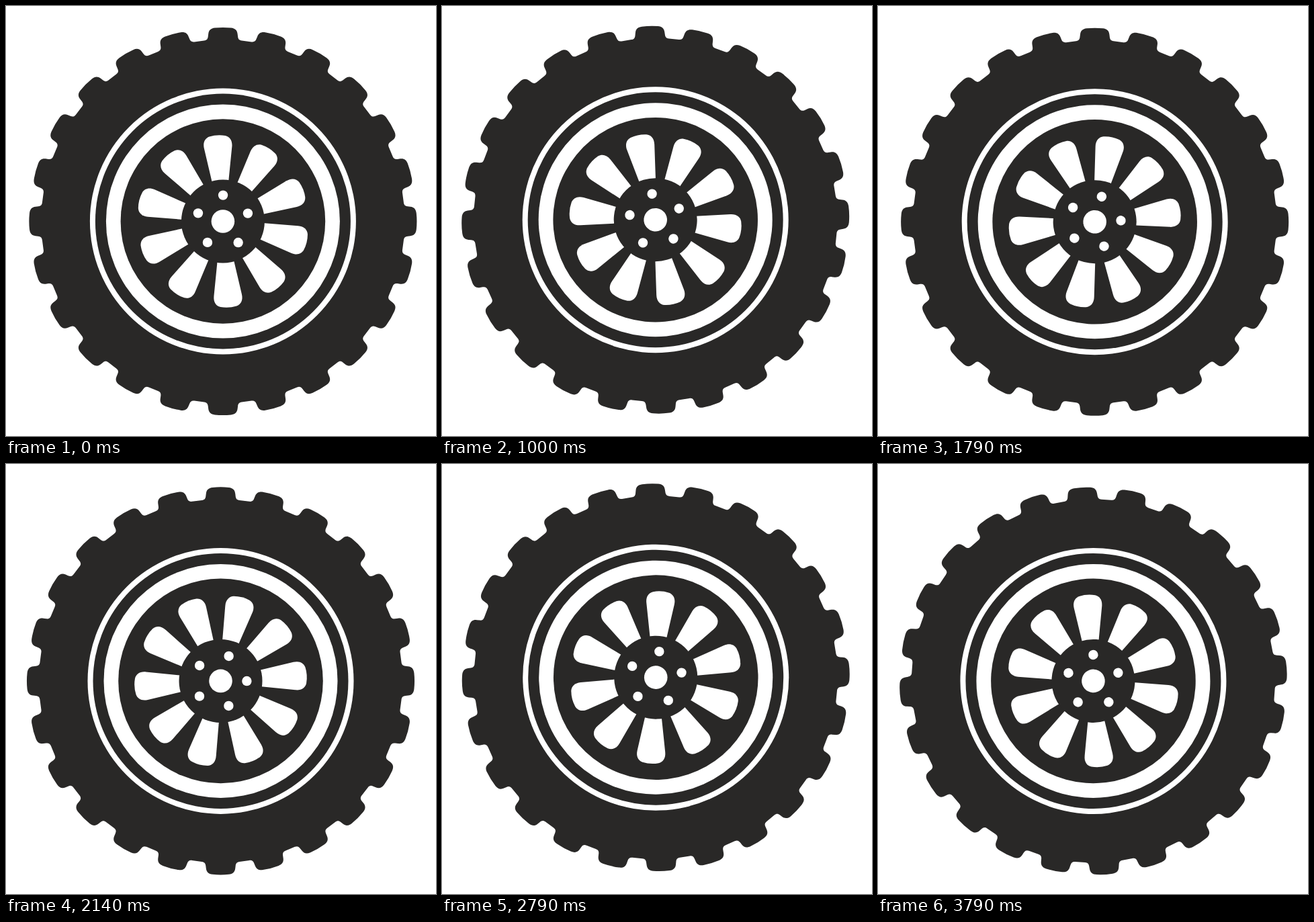
Write an HTML page that moves like this. It is 640x640 px and loops after 3870 ms.

```html
<!DOCTYPE html>
<html lang="en">
<head>
<meta charset="utf-8">
<title>Rolling wheel</title>
<style>
  html, body { margin: 0; width: 100%; height: 100%; overflow: hidden; background: #fff; }
  svg { display: block; width: 640px; height: 640px; }
</style>
</head>
<body>
<svg viewBox="0 0 640 640">
  <g id="spin"><g id="wheel" transform="translate(322.9 320.5)"></g></g>
</svg>
<script>
const DARK = '#292827', LIGHT = '#fff';
const TEETH = 24, SLOTS = 10, LUGS = 5;
const LOOP = 3870, FPS = 14, LAST = 53;
const STEP = 25 / 3, STEP_RATE = 25;   // degrees per step, steps per second

const wheel = document.getElementById('wheel');
const spin = document.getElementById('spin');

function add(tag, attrs) {
  const el = document.createElementNS('http://www.w3.org/2000/svg', tag);
  for (const key in attrs) el.setAttribute(key, attrs[key]);
  wheel.appendChild(el);
}
const disc = (r, fill, cx = 0, cy = 0) => add('circle', { cx, cy, r, fill });

// Turns a point given as sideways offset and height above the hub
function polar(x, h, deg) {
  const a = deg * Math.PI / 180, c = Math.cos(a), s = Math.sin(a);
  return (x * c + h * s).toFixed(2) + ' ' + (x * s - h * c).toFixed(2);
}

function treadPath() {
  let d = '';
  for (let i = 0; i < TEETH; i++) {
    const p = (x, h) => polar(x, h, i * 360 / TEETH);
    d += `${i ? 'L' : 'M'}${p(-28, 269)}
      C${p(-24, 269.5)} ${p(-22.6, 271.5)} ${p(-22.2, 275)}
      L${p(-21.7, 279)}
      C${p(-21, 284.5)} ${p(-18, 287.2)} ${p(-12, 287.9)}
      Q${p(0, 289.2)} ${p(12, 287.9)}
      C${p(18, 287.2)} ${p(21, 284.5)} ${p(21.7, 279)}
      L${p(22.2, 275)}
      C${p(22.6, 271.5)} ${p(24, 269.5)} ${p(28, 269)}`;
  }
  return d + 'Z';
}

function slotPath(deg) {
  const p = (x, h) => polar(x, h, deg);
  return `M${p(-11.6, 55)}L${p(-20.8, 110)}
    C${p(-22.3, 119)} ${p(-18.5, 125)} ${p(-12, 127)}
    Q${p(0, 130)} ${p(12, 127)}
    C${p(18.5, 125)} ${p(22.3, 119)} ${p(20.8, 110)}
    L${p(11.6, 55)}Z`;
}

add('path', { d: treadPath(), fill: DARK });
[[198, LIGHT], [190, DARK], [174, LIGHT], [152.3, DARK]].forEach(([r, fill]) => disc(r, fill));
for (let i = 0; i < SLOTS; i++) add('path', { d: slotPath(i * 360 / SLOTS - 3.8), fill: LIGHT });
disc(62, DARK);
disc(17.3, LIGHT);
for (let i = 0; i < LUGS; i++) {
  const [x, y] = polar(0, 38.9, i * 360 / LUGS + 0.2).split(' ');
  disc(7.2, LIGHT, x, y);
}

// The wheel sits slightly off the pivot, so it wobbles as it turns
function draw(ms) {
  const t = Math.floor((ms % LOOP) / 10) * 10;
  const frame = Math.min(LAST, Math.floor((t + 5) * FPS / 1000));
  const angle = STEP * Math.ceil(frame * STEP_RATE / FPS);
  spin.setAttribute('transform', `rotate(${angle % 360} 320 320)`);
}

const start = performance.now();
function tick() {
  draw(performance.now() - start);
  requestAnimationFrame(tick);
}
draw(0);
requestAnimationFrame(tick);
</script>
</body>
</html>
```
